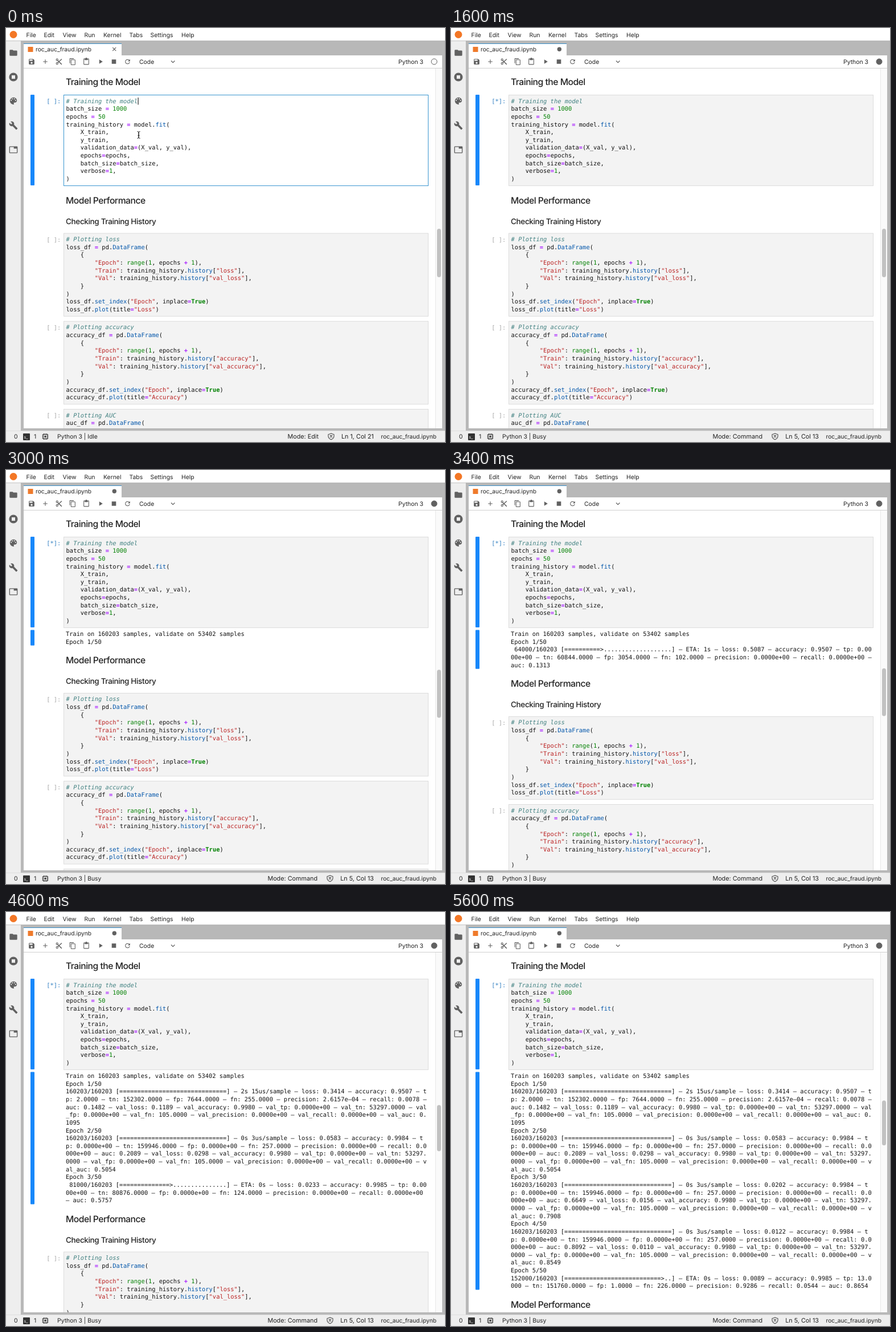
These frames come from a looping animation (771x726 px, 5.8 s). An HTML page:

```html
<!DOCTYPE html>
<html lang="en">
<head>
<meta charset="utf-8">
<title>Training notebook</title>
<style>
html, body { margin: 0; width: 100%; height: 100%; overflow: hidden; background: #fff; }
svg { display: block; width: 771px; height: 726px; }
text { font: 10.4px Inter, "Open Sans", sans-serif; fill: #222; white-space: pre; text-rendering: geometricPrecision; }
.mono { font: 10.43px "DejaVu Sans Mono", monospace; fill: #111; }
.h2 { font-size: 15.7px; font-weight: 500; letter-spacing: -.5px; }
.h3 { font-size: 13.5px; font-weight: 500; letter-spacing: -.35px; }
.comment { fill: #408080; font-style: italic; }
.string { fill: #ba2121; }
.keyword { fill: #008000; font-weight: bold; }
.builtin { fill: #008000; }
.op { fill: #a2f; font-weight: bold; }
.prop { fill: #05a; }
</style>
</head>
<body>
<svg id="stage" viewBox="0 0 771 726"></svg>
<script>
const LOOP = 5800, STEP = 200, LINE = 13.645, CHAR = 6.28;
const CLICK = 600, RUN = 1000, HEADER = 2400, FIRST = 3000, STEADY = 4000;
const SAMPLES = 160203, EPOCH_MS = 409;
const GREY = '#616161';
const stage = document.getElementById('stage');

// loss and auc run from start to end within an epoch; the counts are totals
const epochs = [
  { loss: [.62, .3414], auc: [.12, .1482], tp: 2, fp: 7644, fn: 255, valLoss: .1189, valAuc: .1095 },
  { loss: [.1, .0583], auc: [.15, .2089], tp: 0, fp: 0, fn: 257, valLoss: .0298, valAuc: .5054 },
  { loss: [.0265, .0202], auc: [.4845, .6649], tp: 0, fp: 0, fn: 245, valLoss: .0156, valAuc: .7908 },
  { loss: [.0155, .0122], auc: [.7291, .8092], tp: 0, fp: 0, fn: 266, valLoss: .011, valAuc: .8549 },
  { loss: [.011, .0088], auc: [.83, .8673], tp: 14, fp: 1, fn: 238 }
];

const plot = (name, title) => `# Plotting ${title}
${name}_df = pd.DataFrame(
    {
        "Epoch": range(1, epochs + 1),
        "Train": training_history.history["${name}"],
        "Val": training_history.history["val_${name}"],
    }
)
${name}_df.set_index("Epoch", inplace=True)
${name}_df.plot(title="${title[0].toUpperCase() + title.slice(1)}")`;

const trainCode = `# Training the model
batch_size = 1000
epochs = 50
training_history = model.fit(
    X_train,
    y_train,
    validation_data=(X_val, y_val),
    epochs=epochs,
    batch_size=batch_size,
    verbose=1,
)`;

const rect = (x, y, w, h, fill, more = '') =>
  `<rect x="${x}" y="${y}" width="${w}" height="${h}" fill="${fill}" ${more}/>`;
const circle = (x, y, r, fill, more = '') => `<circle cx="${x}" cy="${y}" r="${r}" fill="${fill}" ${more}/>`;
const text = (x, y, s, more = '') => `<text x="${x}" y="${y}" xml:space="preserve" ${more}>${s}</text>`;
const mono = (x, y, s, color = '#111') => text(x, y, s, `class="mono" style="fill:${color}"`);
const stroke = (d, color = GREY, w = 1.2) => `<path d="${d}" fill="none" stroke="${color}" stroke-width="${w}"/>`;
// icons are drawn on a 24-unit grid around (x, y)
const icon = (x, y, size, body) =>
  `<g transform="translate(${x} ${y}) scale(${size / 24}) translate(-12 -12)" fill="${GREY}">${body}</g>`;
const path = d => `<path fill-rule="evenodd" d="${d}"/>`;

const TOKEN = /(#.*)|("[^"]*")|(\bTrue\b)|(\brange\b|\b\d+\b)|([=+])|((?<=\.)[A-Za-z]\w*)/g;
const KINDS = ['comment', 'string', 'keyword', 'builtin', 'op', 'prop'];
const highlight = line => line.replace(TOKEN, (s, ...groups) =>
  `<tspan class="${KINDS[groups.findIndex(g => g !== undefined)]}">${s}</tspan>`);

function cell(y, code, prompt, promptColor, editing) {
  const lines = code.split('\n');
  return rect(101.5, y + .5, 640, lines.length * LINE + 9, editing ? '#fff' : '#f3f3f3',
      `stroke="${editing ? '#3a96cf' : '#dcdcdc'}"`) +
    mono(71.3, y + 15.4, prompt, promptColor) +
    lines.map((s, i) => text(105.6, y + 14.6 + i * LINE, highlight(s), 'class="mono"')).join('');
}

const num = v => v > 1e-3 ? v.toFixed(4) : v ? v.toExponential(4).replace(/e-(\d)$/, 'e-0$1') : '0.0000e+00';
const fields = o => Object.entries(o).map(([k, v]) => ` - ${k}: ${num(v)}`).join('');

function progress(index, frac) {
  const e = epochs[index], done = frac >= 1;
  const n = done ? SAMPLES : Math.floor(frac * SAMPLES / 1000) * 1000;
  const f = n / SAMPLES, w = Math.floor(30 * f);
  const bar = w ? '='.repeat(w - 1) + (done ? '=' : '>') + '.'.repeat(30 - w) : '.'.repeat(30);
  const mix = ([a, b]) => a + (b - a) * f;
  const tp = Math.floor(e.tp * f), fp = Math.round(e.fp * f);
  const fn = done ? 257 - tp : Math.round(e.fn * f);
  const tn = n - tp - fp - fn;
  const timing = done ? (index ? '0s 3us/sample' : '2s 15us/sample') : `ETA: ${index ? 0 : 1}s`;
  let s = `${String(n).padStart(6)}/${SAMPLES} [${bar}] - ${timing}` + fields({
    loss: mix(e.loss), accuracy: n ? (tp + tn) / n : 0, tp, tn, fp, fn,
    precision: tp && tp / (tp + fp), recall: tp && tp / (tp + fn), auc: mix(e.auc)
  });
  if (done) s += fields({
    val_loss: e.valLoss, val_accuracy: .998, val_tp: 0, val_tn: 53297, val_fp: 0,
    val_fn: 105, val_precision: 0, val_recall: 0, val_auc: e.valAuc
  });
  return s;
}

// 101 columns, never starting a row with punctuation; a space may hang at the end
const wrap = s => s.match(/.{1,101}(?![:.]) ?/g);

function output(t) {
  if (t < HEADER) return [];
  const p = t < STEADY ? Math.max(0, t - FIRST) / 1000 : 2.506 + (t - 4600) / EPOCH_MS;
  const current = Math.floor(p), frac = p - current;
  const rows = [`Train on ${SAMPLES} samples, validate on 53402 samples`];
  for (let i = 0; i <= current; i++) {
    if (i && i === current && frac < .05) break;
    rows.push(`Epoch ${i + 1}/50`);
    if (i < current || frac > 0) rows.push(...wrap(progress(i, i < current ? 1 : frac)));
  }
  return rows;
}

function notebook(t, rows, shift) {
  const running = t >= RUN, clicked = t >= CLICK;
  let s = text(105, 99.6, 'Training the Model', 'class="h2"') +
    rect(43, 117, 7, 159, '#1787fa', 'rx="1"') +
    cell(117, trainCode, running ? '[*]:' : '[ ]:', '#307fc1', !running);
  if (!running) {
    const [x, y] = clicked ? [12, 4] : [20, 0];
    s += rect(106 + x * CHAR, 122 + y * LINE, 1, 12.5, '#000') +
      stroke('M230.5 181.5q2.5 0 2.5 1.5v9q0 1.5-2.5 1.5M235.5 181.5q-2.5 0-2.5 1.5v9q0 1.5 2.5 1.5M231.5 188.5h3', '#222', 1);
  }
  if (rows.length) s += rect(43, 280.5, 7, rows.length * LINE, '#1787fa', 'rx="1"');
  s += rows.map((row, i) => mono(105, 291 + i * LINE, row.replace(/-/g, '–'))).join('');
  return s + `<g transform="translate(0 ${shift})">` +
    text(105, 307.6, 'Model Performance', 'class="h2"') +
    text(105, 344, 'Checking Training History', 'class="h3"') +
    [['loss', 'loss'], ['accuracy', 'accuracy'], ['auc', 'AUC']].map(([name, title], i) =>
      cell(359.6 + i * 154.2, plot(name, title), '[ ]:', '#a6a6a6')).join('') + '</g>';
}

function sidebar() {
  const holes = [[6.5, 10.5], [9.5, 6.5], [14.5, 6.5], [17.5, 10.5]];
  return rect(0, 22, 26, 684, '#eee') + rect(0, 22, 26, 1, '#c4c4c4') +
    icon(13, 43.5, 16, path('M10 4H4q-2 0-2 2v12q0 2 2 2h16q2 0 2-2V8q0-2-2-2h-8z')) +
    circle(13, 86, 7.6, GREY) + rect(10, 83, 6, 6, '#eee') +
    icon(13, 128, 16.5, path('M12 3a9 9 0 0 0 0 18c1.4 0 2-1.4 1.1-2.5-.9-1 0-2.5 1.1-2.5H16c2.8 0 5-2.2 5-5 0-4.4-4-8-9-8z') +
      holes.map(([x, y]) => circle(x, y, 1.5, '#eee')).join('')) +
    icon(13, 171, 16, path('M22.7 19l-9.1-9.1c.9-2.3.4-5-1.5-6.9-2-2-5-2.4-7.4-1.3L9 6 6 9 1.6 4.7C.4 7.1.9 10.1 2.9 12.1c1.9 1.9 4.6 2.4 6.9 1.5l9.1 9.1q.7.6 1.4 0l2.3-2.3q.8-.7.1-1.4z')) +
    icon(13, 213.5, 16, path('M21 3H3q-2 0-2 2v14q0 2 2 2h18q2 0 2-2V5q0-2-2-2zm0 16H3V5h10v4h8z'));
}

function toolbar(running) {
  const icons = [
    [45, path('M17 3H5q-2 0-2 2v14q0 2 2 2h14q2 0 2-2V7zM12 19a3 3 0 1 1 0-6 3 3 0 0 1 0 6zM15 9H5V5h10z')],
    [69, path('M19 13h-6v6h-2v-6H5v-2h6V5h2v6h6z')],
    [93, stroke('M7.5 8L21 21M7.5 16L21 3.5', GREY, 2.6) +
      [6, 18].map(y => circle(6, y, 3, 'none', `stroke="${GREY}" stroke-width="2"`)).join('')],
    [117, path('M16 1H4q-2 0-2 2v14h2V3h12zM19 5H8q-2 0-2 2v14q0 2 2 2h11q2 0 2-2V7q0-2-2-2zm0 16H8V7h11z')],
    [141, path('M19 2h-4a3 3 0 0 0-6 0H5q-2 0-2 2v16q0 2 2 2h14q2 0 2-2V4q0-2-2-2zm0 18H5V4h2v3h10V4h2z')],
    [166, path('M8 5v14l11-7z')],
    [189.5, path('M5 5h14v14H5z')],
    [213.5, path('M17.65 6.35A8 8 0 1 0 19.73 14h-2.08A6 6 0 1 1 16.22 7.78L13 11h7V4z')]
  ];
  return rect(31, 48, 735, 23, '#fff') + rect(31, 70, 735, 1, '#cfcfcf') +
    icons.map(([x, body]) => icon(x, 59, 13, body)).join('') +
    text(234, 62.6, 'Code') + stroke('M290 57.5l3.2 3.2 3.2-3.2') +
    text(689, 63.4, 'Python 3') +
    circle(752, 59, 5, running ? GREY : '#fff', `stroke="${GREY}"`);
}

function statusbar(running, clicked) {
  const end = clicked ? 547 : 549, x = end + 22;
  const pins = [66.5, 69, 71.5].map(v => `M${v} 711v11M63.5 ${v + 647.5}h11`).join('');
  return rect(0, 706, 771, 20, '#eee') + rect(0, 706, 771, 1, '#dedede') +
    text(14, 720.2, '0') + rect(30, 711, 12, 12, '#333', 'rx="1"') +
    text(31.5, 719.5, 's_', 'style="font-size:7px;fill:#fff"') + text(49, 720.2, '1') +
    stroke(pins, '#444', 1) + rect(65.2, 712.7, 7.6, 7.6, '#eee', 'stroke="#444" stroke-width="1.3"') +
    rect(67.3, 714.8, 3.4, 3.4, '#444') +
    text(90, 720.2, `Python 3 | ${running ? 'Busy' : 'Idle'}`) +
    text(end, 720.2, `Mode: ${running ? 'Command' : 'Edit'}`, 'text-anchor="end" style="font-size:10.8px"') +
    stroke(`M${x} 711l5 1.8v3q0 4-5 6-5-2-5-6v-3zM${x - 2} 714l4 4m0-4l-4 4`, '#444', 1.1) +
    text(646, 720.2, clicked ? 'Ln 5, Col 13' : 'Ln 1, Col 21', 'text-anchor="end" style="font-size:10.8px"') +
    text(756, 720.2, 'roc_auc_fraud.ipynb', 'text-anchor="end" style="font-size:10.2px"');
}

function scene(t) {
  const running = t >= RUN, rows = output(t);
  const shift = rows.length ? rows.length * LINE + 4 : 0;
  const view = 631, scale = view / (4684 + shift);
  const menu = { File: 35.5, Edit: 66.5, View: 99.5, Run: 137.5, Kernel: 171, Tabs: 216.5, Settings: 253.5, Help: 308 };
  return '<clipPath id="page"><path d="M31 71h723v631H31z"/></clipPath>' +
    rect(0, 0, 771, 726, '#b8b8b8') + rect(0, 0, 771, 22, '#fff') +
    circle(13, 11.5, 6.5, '#f37726') +
    Object.entries(menu).map(([s, x]) => text(x, 15.7, s)).join('') +
    sidebar() +
    rect(31, 27, 172, 21, '#fff') + rect(31, 27, 172, 1, '#3a8fc9') +
    rect(38.5, 33, 9, 9, '#ef7a2b') +
    text(52, 41.2, 'roc_auc_fraud.ipynb', 'style="font-size:10.25px"') +
    (running ? circle(190.3, 37.2, 3.7, GREY) : stroke('M187.2 34.2l6 6m0-6l-6 6')) +
    toolbar(running) +
    rect(31, 71, 735, view, '#fff') +
    `<g clip-path="url(#page)">${notebook(t, rows, shift)}</g>` +
    rect(754, 71, 12, view, '#fafafa') + rect(754, 71, 1, view, '#e8e8e8') +
    rect(757, 71 + 2086 * scale, 7, view * scale, '#c1c1c1', 'rx="3.5"') +
    statusbar(running, t >= CLICK);
}

let shown = -1;
function draw() {
  const t = Math.floor(performance.now() % LOOP / STEP) * STEP;
  if (t !== shown) stage.innerHTML = scene(shown = t);
  requestAnimationFrame(draw);
}
draw();
</script>
</body>
</html>
```
